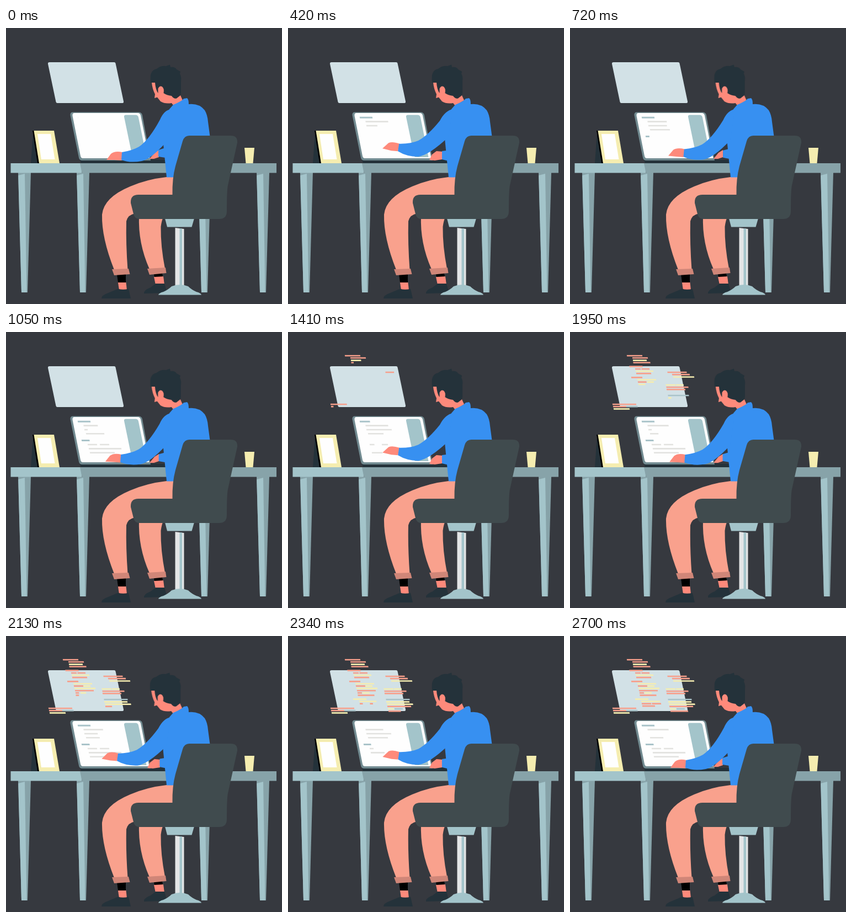
Recreate the animation shown at these times as an HTML page without scripts. Size 500 by 500 pixels, loop 2730 ms.

```html
<!DOCTYPE html>
<html lang="en">
<head>
<meta charset="utf-8">
<title>Working at a desk</title>
<style>
@property --t { syntax: "<number>"; inherits: true; initial-value: 0; }
html, body { margin: 0; width: 100%; height: 100%; overflow: hidden; background: #36393f; }
svg { display: block; width: 100%; height: 100%; animation: clock 2730ms linear infinite; }
@keyframes clock { from { --t: 0; } to { --t: 2730; } }

.teal { fill: #a3c4ca; }
.shade { fill: #87a3a9; }
.dark { fill: #24323a; }
.skin { fill: #fe8a7b; }
.shirt { fill: #3790f1; }
.trousers { fill: #f9a18d; }
.cuff { fill: #d08678; }
.cream { fill: #f5edb0; }
.white { fill: #fefefe; }

/* Code rows: each grows from its left end, one after another */
.code path {
  stroke-width: 2.7;
  transform-box: fill-box;
  transform-origin: 0 50%;
  transform: skewX(11deg);
  scale: clamp(0, (var(--t) - var(--start) - var(--i) * var(--step)) / 110, 1) 1;
}
.p { stroke: #f79f8b; }
.y { stroke: #f5edb0; }
.b { stroke: #a9c3c9; }

/* Lines on the laptop */
.text path {
  stroke: #e2e2df;
  stroke-width: 2.6;
  transform-box: fill-box;
  transform-origin: 0 50%;
  transform: skewX(11deg);
  animation: 2730ms linear infinite;
}
.text .head { stroke: #a9c3c9; stroke-width: 3; }
@keyframes head1 { 0% { scale: 0 1; } 6%, 45% { scale: 1 1; } 51.6% { scale: .8 1; } 56%, 80% { scale: 1 1; } 85%, 86.5% { scale: 0 1; } 93%, 100% { scale: 1 1; } }
@keyframes row1 { 0%, 5% { scale: 0 1; } 12%, 18% { scale: 1 1; } 38.5% { scale: .63 1; } 51.6% { scale: 1 1; } 71.4% { scale: .93 1; } 85.7% { scale: .78 1; } 98.9%, 100% { scale: .93 1; } }
@keyframes row2 { 0%, 11% { scale: 0 1; } 15.4% { scale: .43 1; } 21% { scale: 1 1; } 38.5% { scale: .13 1; } 51.6% { scale: 1 1; } 71.4% { scale: .13 1; } 85.7% { scale: .98 1; } 98.9%, 100% { scale: 0 1; } }
@keyframes row3 { 0%, 20% { scale: 0 1; } 26% { scale: 1 1; } 38.5% { scale: .92 1; } 51.6% { scale: .78 1; } 71.4% { scale: .42 1; } 85.7% { scale: 1 1; } 98.9%, 100% { scale: .67 1; } }
@keyframes head2 { 0%, 25% { scale: 0 1; } 28%, 42% { scale: 1 1; } 48%, 52% { scale: 0 1; } 58%, 80% { scale: 1 1; } 85.7% { scale: .93 1; } 90%, 100% { scale: 1 1; } }
@keyframes row4 { 0%, 28% { scale: 0 1; } 31%, 42% { scale: 1 1; } 51.6% { scale: .5 1; } 62%, 79% { scale: 1 1; } 85.7% { scale: .41 1; } 93%, 100% { scale: 1 1; } }
@keyframes row5 { 0%, 30% { scale: 0 1; } 33%, 42% { scale: 1 1; } 51.6% { scale: .65 1; } 62%, 79% { scale: 1 1; } 85%, 87% { scale: 0 1; } 95%, 100% { scale: 1 1; } }
@keyframes row6 { 0%, 32% { scale: 0 1; } 36%, 42% { scale: 1 1; } 49%, 52% { scale: 0 1; } 64%, 79% { scale: 1 1; } 85.7% { scale: .42 1; } 95%, 100% { scale: 1 1; } }
@keyframes row7 { 0%, 34% { scale: 0 1; } 38%, 42% { scale: 1 1; } 51.6% { scale: .42 1; } 64%, 79% { scale: 1 1; } 85%, 87% { scale: 0 1; } 97%, 100% { scale: 1 1; } }

/* Three strokes to the left and back per loop */
.man { animation: 455ms ease-in-out infinite alternate; }
.top { animation-name: nod; }
.arm { animation-name: arm; }
.hand { animation-name: hand; }
.far-arm { animation-name: far-arm; }
.far-hand { animation-name: far-hand; }
@keyframes nod { to { transform: translateX(-1px); } }
@keyframes arm {
  from { d: path("M299 147Q286 149 279 166Q259 203 241 215Q229 222 210 225L209 239Q225 245 246 241Q262 238 290 207Z"); }
  to { d: path("M299 147Q285 149 275 168Q254 194 236 204Q222 210 201 209.5L199 223Q215 233 236 233Q256 230 290 198Z"); }
}
@keyframes hand {
  from { d: path("M182 239L190 228Q197 222 211 225L209.5 240L196 239Z"); }
  to { d: path("M171 218L182 208Q189 205 202 209.5L199 223L187 222Z"); }
}
@keyframes far-arm {
  from { d: path("M276 221L295 215V236L276 233Z"); }
  to { d: path("M279 223L295 221V242L279 238Z"); }
}
@keyframes far-hand {
  from { d: path("M260 237L269 226L277 221V234L268 237Z"); }
  to { d: path("M256 239L261 229L269 223L280 224L279 238L266 240Z"); }
}
</style>
</head>
<body>
<svg viewBox="0 0 500 500">
  <defs>
    <g id="leg">
      <path class="shade" d="M22 262H45L39 479H28Z"/>
      <path class="teal" d="M22.200 267L34 264L37.500 479H28Z"/>
    </g>
  </defs>
  <rect width="500" height="500" fill="#36393f"/>

  <!-- Floating panel -->
  <path fill="#d2e1e6" d="M79 62H196Q198 62 198.500 64L213 133Q213.500 136 211 136H93Q91 136 90.500 134L76 65Q75.500 62 79 62Z"/>
  <g class="code" style="--start:1200;--step:65">
    <path class="p" style="--i:0" d="M103 43h28"/>
    <path class="p" style="--i:1" d="M113 47h28"/>
    <path class="y" style="--i:2" d="M114 51.300h25"/>
    <path class="p" style="--i:3" d="M114.500 55.500h31"/>
    <path class="p" style="--i:4" d="M107.500 62.500h24"/>
    <path class="p" style="--i:5" d="M118 67h10"/>
    <path class="p" style="--i:5" d="M129.500 67h14.500"/>
    <path class="y" style="--i:6" d="M119 71h32"/>
    <path class="p" style="--i:7" d="M120 75.200h27"/>
    <path class="p" style="--i:8" d="M111 82.300h20"/>
    <path class="y" style="--i:9" d="M122 86.500h34"/>
    <path class="p" style="--i:10" d="M123 90.600h17"/>
    <path class="y" style="--i:10" d="M140 90.600h13"/>
    <path class="y" style="--i:11" d="M124 94.800h38"/>
    <path class="p" style="--i:12" d="M125 99h34"/>
    <path class="p" style="--i:13" d="M126 103.200h8"/>
    <path class="y" style="--i:13" d="M135 103.200h13"/>
    <path class="p" style="--i:14" d="M126.500 107.300h30"/>
    <path class="y" style="--i:15" d="M118 114.300h24"/>
    <path class="y" style="--i:16" d="M129 118.500h34"/>
    <path class="p" style="--i:17" d="M130 122.600h17"/>
    <path class="p" style="--i:17" d="M148.500 122.600h16.500"/>
    <path class="p" style="--i:18" d="M131 126.800h23"/>
  </g>
  <g class="code" style="--start:1362;--step:82">
    <path class="p" style="--i:0" d="M176.500 73h35"/>
    <path class="p" style="--i:1" d="M185 77.200h32"/>
    <path class="y" style="--i:2" d="M187 81.500h38"/>
    <path class="y" style="--i:3" d="M173.500 96h17.500"/>
    <path class="y" style="--i:3" d="M192 96h14"/>
    <path class="p" style="--i:4" d="M174.500 100h40"/>
    <path class="p" style="--i:5" d="M175 104.200h34"/>
    <path class="b" style="--i:6" d="M177.500 115h43"/>
    <path class="y" style="--i:7" d="M178 119.300h42"/>
    <path class="y" style="--i:8" d="M179.500 123.600h47"/>
    <path class="p" style="--i:9" d="M180 127.700h43"/>
    <path class="y" style="--i:10" d="M181 132h11"/>
    <path class="b" style="--i:10" d="M193 132h15"/>
    <path class="p" style="--i:11" d="M182 136.200h32"/>
  </g>
  <g class="code" style="--start:1335;--step:56">
    <path class="p" style="--i:0" d="M77 131h43"/>
    <path class="p" style="--i:1" d="M78 135.200h24"/>
    <path class="b" style="--i:2" d="M102 135.200h20.500"/>
    <path class="y" style="--i:3" d="M79 139.400h29"/>
  </g>

  <!-- Desk -->
  <use href="#leg"/>
  <use href="#leg" x="106"/>
  <use href="#leg" x="326"/>
  <use href="#leg" x="432"/>
  <path class="teal" d="M8.500 245H138L137 262.500H8.500Z"/>
  <path class="shade" d="M134 245H490V262.500H137.500Z"/>

  <!-- Picture frame and cup -->
  <path class="dark" d="M49 190L45 245H60Z"/>
  <path d="M48 186H51L60 245H57Z"/>
  <path class="cream" d="M50.500 186H87L97 245H60Z"/>
  <path class="white" d="M57 192H81L88.500 238H64Z"/>
  <path class="cream" d="M432 217H450L447.500 245H434.500Z"/>

  <!-- Laptop -->
  <path class="dark" d="M134 239H291V245H136Z"/>
  <path fill="#728b91" d="M121 152.500H240Q246 152.500 247 158L262 240H138Q133 240 132 235L116.500 158Q116 152.500 121 152.500Z"/>
  <path class="white" d="M124 154H239Q243 154 244 158.500L259.500 236H139Q136 236 135 232L120.500 159Q120 154 124 154Z"/>
  <path class="teal" d="M217 157.500H235Q239 157.500 240 162L254.500 234H231Q229 234 228.500 231L214 161Q213.500 157.500 217 157.500Z"/>
  <g class="text">
    <path class="head" style="animation-name:head1" d="M130 162.200h23"/>
    <path style="animation-name:row1" d="M140.500 169.600h41"/>
    <path style="animation-name:row2" d="M142 177h46"/>
    <path style="animation-name:row3" d="M145 184.300h36"/>
    <path class="head" style="animation-name:head2" d="M137 196.500h14.500"/>
    <path style="animation-name:row4" d="M148 204h17"/>
    <path style="animation-name:row5" d="M170 204h17"/>
    <path style="animation-name:row6" d="M150 211.400h59"/>
    <path style="animation-name:row7" d="M152 218.700h45"/>
  </g>

  <!-- Legs and shoes -->
  <path d="M268 445L283 444L284 451H269Z"/>
  <path class="skin" d="M268 451L285 450L287 465H271Z"/>
  <path class="dark" d="M250 481Q249 475 262 470L271 463H287L292 480Z"/>
  <path class="trousers" d="M241 340Q239 390 260 437L288 436Q280 395 280.500 360Q282 348 286 340Z"/>
  <path class="cuff" d="M256 436L289 434L290.500 444L260 447Z"/>
  <path d="M201 446H217V461H203Z"/>
  <path class="skin" d="M203 461H217.500L219 475H205Z"/>
  <path class="dark" d="M173 490Q173 484 185 480L203 472.500Q212 475 222 472.500L226 490Z"/>
  <path class="trousers" d="M291 270Q255 274 225 287Q177 307 174 338Q173 380 196 438H220.500Q217 390 218 350Q221 338 234 336L310 325V270Z"/>
  <path class="cuff" d="M192 437L222 436L224.500 446L196 448Z"/>

  <!-- Upper body -->
  <path class="man skin far-hand" d="M260 237L269 226L277 221V234L268 237Z"/>
  <path class="man shirt far-arm" d="M276 221L295 215V236L276 233Z"/>
  <g class="man top">
    <path class="dark" d="M262 99Q261 86 263 82Q266 75 273 74Q280 68 290 69L297 66.500L298 71Q306 70 309 75L316 79L315 83Q318 87 317 97V118Q315 128 307 128Q298 126 286 119L276 119Q270 110 269 99Z"/>
    <path class="skin" d="M264 99H270Q271 112 275.500 118V110Q278 104 282.500 106Q287 109 285.500 118Q291 122 300 123Q304 129 309 127.500L316 122L320 131L304 141L300 136Q288 138 280 133L274 125.500L269 127L270 120Q265 110 264 99Z"/>
  </g>
  <path class="shirt" d="M296 147L303 139Q318 133 322 128L328 127Q331 129 331 138Q350 136 360 149Q365 157 366 170L370 200L320 240L305 270.500H291L284 200Z"/>
  <path class="man skin hand" d="M182 239L190 228Q197 222 211 225L209.500 240L196 239Z"/>
  <path class="man shirt arm" d="M299 147Q286 149 279 166Q259 203 241 215Q229 222 210 225L209 239Q225 245 246 241Q262 238 290 207Z"/>

  <!-- Chair -->
  <path fill="#e3e5e6" d="M306.500 362L322.500 364V468H306.500Z"/>
  <path class="teal" d="M314.500 363L319 363.500V468H314.500Z"/>
  <path class="teal" d="M288 345H341L336.500 360.500H292Z"/>
  <path class="teal" d="M276 483.500Q277 480 285 478Q294 474 300 468Q315 462 330 468Q336 474 345 478Q353 480 354 483.500Z"/>
  <path fill="#404b4e" d="M332 195H407Q420 195 419 208L402 285Q400 295 400 332Q400 346 386 346H242Q233 346 231 337L226 317Q225 302 240 302H301.500Q301 272 307 250L320 205Q323 195 332 195Z"/>
</svg>
</body>
</html>
```
